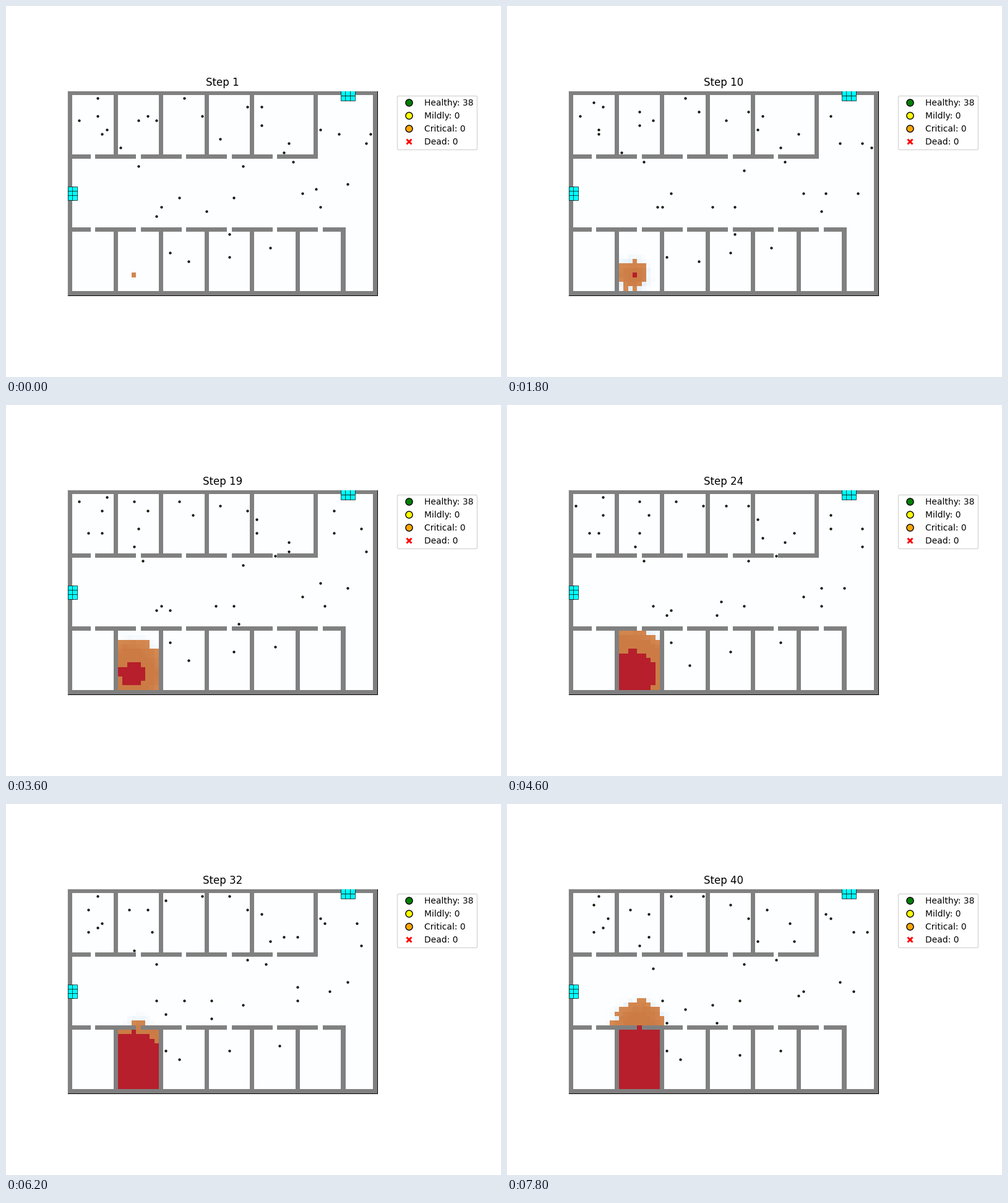
Write a matplotlib script that moves like this. It is 800x600 px and loops after 8 s.

```python
import random

import numpy as np
import matplotlib.pyplot as plt
from matplotlib.animation import FuncAnimation
from matplotlib.lines import Line2D

W, H, STEPS = 68, 45, 40
SEED, DOOR = (14, 40), (15, 30)   # where the fire starts and leaves the room
DOOR_STEP = 28                    # step at which it breaks through the door
CHAR_DELAY = 10                   # steps from ignition to the dark red stage
PACE = 2.1                        # steps the fire needs per cell
RESTLESS = 0.45                   # chance that a person tries to move


def rgb(*parts):
    return np.array(parts) / 255


FLOOR, WALL = rgb(253, 254, 255), rgb(128, 128, 128)
SMOKE = rgb(226, 239, 249)
FLAME, FRESH = rgb(204, 123, 69), rgb(213, 138, 82)
EMBER = rgb(182, 31, 43)

START = [
    (6, 1), (6, 5), (2, 6), (8, 8), (7, 9), (17, 5), (15, 6), (19, 6),
    (11, 12), (25, 1), (29, 5), (39, 3), (33, 10), (42, 3), (42, 7),
    (48, 11), (47, 13), (55, 8), (59, 9), (66, 9), (65, 11), (61, 20),
    (15, 16), (38, 16), (49, 15), (24, 23), (36, 23), (30, 26), (20, 25),
    (19, 27), (51, 22), (54, 21), (55, 25), (22, 35), (26, 37), (35, 31),
    (35, 36), (44, 34),
]


def build_walls():
    wall = np.zeros((H, W), bool)
    wall[[0, -1], :] = True
    wall[:, [0, -1]] = True
    wall[14, :55] = True
    wall[30, :61] = True
    wall[:15, [10, 20, 30, 40, 54]] = True
    wall[30:, 10:61:10] = True
    wall[14, 5:46:10] = False
    wall[30, 5:56:10] = False
    return wall


def build_fire():
    """Ignition step of every cell: two ragged fronts, room then hall."""
    y, x = np.mgrid[:H, :W]

    def front(origin, start):
        dx, dy = x - origin[0], y - origin[1]
        lit = start + PACE * np.hypot(dx, dy) + 2 * (grain - 0.5)
        lit[origin[1], origin[0]] = start
        return lit

    room = (x > 10) & (x < 20) & (y > 30)
    hall = (y > 14) & (y <= 30)
    lit = np.full((H, W), np.inf)
    # the room burns a little faster towards its left side
    lit[room] = (front(SEED, 3) + 0.3 * (x - SEED[0]))[room]
    lit[hall] = front(DOOR, DOOR_STEP)[hall]
    lit[SEED[1], SEED[0]] = 0
    return lit


def build_paths():
    """Lazy random walks that avoid walls, fire and each other."""
    rng = random.Random(7)
    people = list(START)
    history = [list(people)]
    for step in range(2, STEPS + 1):
        for i, (x, y) in enumerate(people):
            x, y = x + rng.randint(-1, 1), y + rng.randint(-1, 1)
            free = not walls[y, x] and lit[y, x] > step and (x, y) not in people
            if free and rng.random() < RESTLESS:
                people[i] = x, y
        history.append(list(people))
    return np.array(history) + 0.5


grain = np.random.default_rng(3).random((H, W))
walls = build_walls()
lit = build_fire()
paths = build_paths()


def scene(step):
    age = (step - lit)[..., None]
    haze = np.clip(1 + age / 4, 0, 1) * grain[..., None]
    fresh = np.clip(1 - age / 5, 0, 1)
    img = FLOOR + haze * (SMOKE - FLOOR)
    img = np.where(age >= 0, FLAME + fresh * (FRESH - FLAME), img)
    img = np.where(age >= CHAR_DELAY, EMBER, img)
    img[walls] = WALL
    return img


fig, ax = plt.subplots(figsize=(8, 6), dpi=100)
fig.subplots_adjust(left=0.125, right=0.75, bottom=0.11, top=0.88)
image = ax.imshow(scene(1), extent=(0, W, H, 0), interpolation="nearest", zorder=1)
ax.set(xticks=[], yticks=[])
for spine in ax.spines.values():
    spine.set_zorder(0)

exits = [(c, r) for c in (60, 61, 62) for r in (0, 1)]
exits += [(c, r) for c in (0, 1) for r in (21, 22, 23)]
cell = 500 / W * 72 / fig.dpi
ax.plot(*(np.array(exits) + 0.5).T, "s", ms=cell, mfc="cyan", mec="black",
        mew=0.5, zorder=2)

dots, = ax.plot([], [], "o", ms=2, mfc="green", mec="black", mew=1, zorder=3)
title = ax.set_title("Step 1")


def key(label, color, marker="o", edge="black"):
    return Line2D([0], [0], marker=marker, color="w", label=label,
                  markerfacecolor=color, markeredgecolor=edge, markersize=8)


ax.legend(handles=[key(f"Healthy: {len(START)}", "green"),
                   key("Mildly: 0", "yellow"),
                   key("Critical: 0", "orange"),
                   key("Dead: 0", "red", "X", "white")],
          loc="upper left", bbox_to_anchor=(1.05, 1))
ax.set(xlim=(0, W), ylim=(H, 0))


def update(i):
    image.set_data(scene(i + 1))
    dots.set_data(*paths[i].T)
    title.set_text(f"Step {i + 1}")
    return image, dots, title


anim = FuncAnimation(fig, update, frames=STEPS, interval=200, repeat=True)
plt.show()
```
